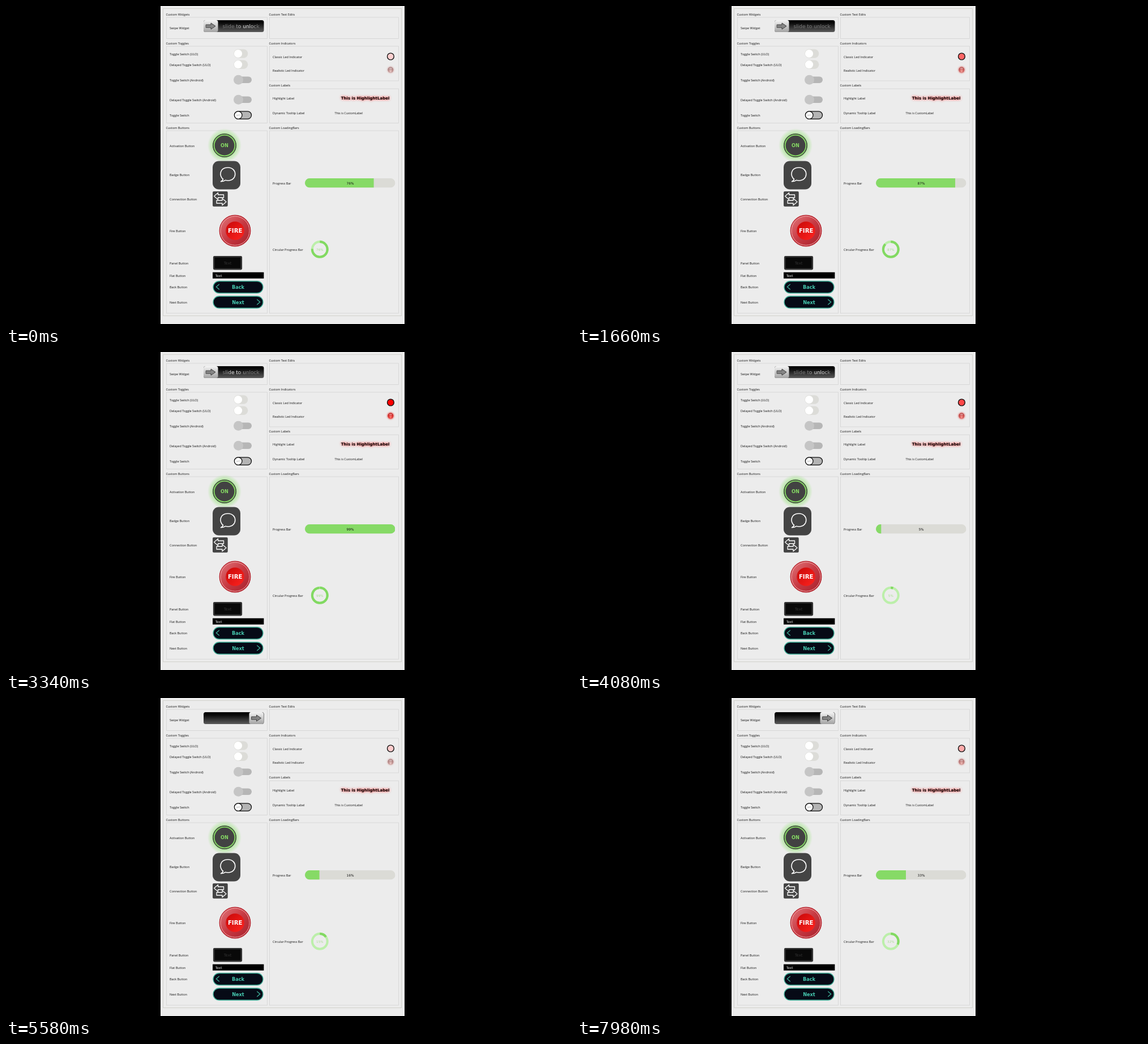
Recreate the animation shown at these times as an HTML page. Size 998 by 561 pixels, loop 8 s.

```html
<!DOCTYPE html>
<html lang="en">
<head>
<meta charset="utf-8">
<title>Custom widgets</title>
<style>
html, body { margin: 0; width: 100%; height: 100%; overflow: hidden; background: #000; }
svg { display: block; width: 100%; height: 100%; }
text { font: 5.5px "Open Sans", sans-serif; fill: #111; }
.wide { font-family: "DejaVu Sans", sans-serif; }
.bold { font-family: "DejaVu Sans", sans-serif; font-weight: bold; }
.mid { text-anchor: middle; }
.line { fill: none; stroke-linejoin: round; stroke-linecap: round; }
</style>
</head>
<body>
<svg viewBox="0 0 998 561">
  <defs>
    <linearGradient id="slot" x2="0" y2="1"><stop offset=".2" stop-color="#060606"/><stop offset="1" stop-color="#5c5c5c"/></linearGradient>
    <linearGradient id="grip" x2="0" y2="1"><stop stop-color="#f4f4f4"/><stop offset="1" stop-color="#a2a2a2"/></linearGradient>
    <linearGradient id="shine" gradientUnits="userSpaceOnUse" x1="-20" x2="20">
      <stop stop-color="#777"/><stop offset=".4" stop-color="#eee"/><stop offset=".6" stop-color="#eee"/><stop offset="1" stop-color="#777"/>
    </linearGradient>
    <radialGradient id="aura"><stop offset=".62" stop-color="#8be36a" stop-opacity=".65"/><stop offset="1" stop-color="#8be36a" stop-opacity="0"/></radialGradient>
    <linearGradient id="rim" x2="1" y2="1"><stop stop-color="#e2777b"/><stop offset=".5" stop-color="#c73a43"/><stop offset="1" stop-color="#a51f2a"/></linearGradient>
    <linearGradient id="core" x2="1" y2="1"><stop stop-color="#c80808"/><stop offset="1" stop-color="#ff2420"/></linearGradient>
    <radialGradient id="bulbOff" cy=".75"><stop stop-color="#eee4e2"/><stop offset=".6" stop-color="#bcaeac"/><stop offset="1" stop-color="#a99b9a"/></radialGradient>
    <radialGradient id="bulbOn" cy=".7"><stop stop-color="#ff8b80"/><stop offset=".6" stop-color="#e33a36"/><stop offset="1" stop-color="#c62a2a"/></radialGradient>
    <filter id="blur" x="-20%" y="-150%" width="140%" height="400%"><feGaussianBlur stdDeviation="2.2"/></filter>
    <filter id="soft" x="-50%" y="-50%" width="200%" height="200%"><feGaussianBlur stdDeviation=".8"/></filter>
    <clipPath id="barClip"><rect x="528" y="304" width="159.5" height="16.5" rx="8.2"/></clipPath>
  </defs>

  <rect x="273" width="431" height="561" fill="#ececec"/>
  <rect x="277.5" y="4.5" width="421" height="542" fill="none" stroke="#d2d2cc"/>
  <g id="groups" fill="none" stroke="#d3d3d3" stroke-width=".8"></g>
  <g id="labels"></g>

  <rect x="349" y="25" width="106.5" height="21" rx="3.5" fill="url(#slot)"/>
  <text id="hint" class="wide" x="382.5" y="39" style="font-size:9px;fill:url(#shine)">slide to unlock</text>
  <g id="handle">
    <rect x="349" y="25" width="25.5" height="21" rx="3.5" fill="url(#grip)"/>
    <path class="line" d="M353.5 33h8.500v-3l8 5.500-8 5.500v-3h-8.500z" style="fill:#858585" stroke="#333" stroke-width=".9"/>
  </g>

  <g id="toggles"></g>
  <rect x="403.500" y="185.800" width="30" height="13.600" rx="6.800" fill="#b4b4b4" stroke="#111" stroke-width="1.300"/>
  <circle cx="410.200" cy="192.600" r="6.800" fill="#fff" stroke="#111" stroke-width="1.300"/>
  <text class="wide mid" x="410.200" y="193.700" style="font-size:3.200px;fill:#888">OFF</text>

  <circle id="led" cx="679.400" cy="89" r="5.900" stroke="#111" stroke-width="1.400"/>
  <circle cx="679.300" cy="112.600" r="6" fill="#d9d2d1" filter="url(#soft)"/>
  <circle cx="679.300" cy="112.600" r="5" fill="url(#bulbOff)"/>
  <g id="bulb">
    <circle cx="679.300" cy="112.600" r="6.300" fill="#f08a86" filter="url(#soft)"/>
    <circle cx="679.300" cy="112.600" r="5" fill="url(#bulbOn)"/>
  </g>
  <ellipse cx="679.300" cy="110.300" rx="2.800" ry="1.500" fill="#fff" opacity=".35"/>

  <text class="bold" x="591.800" y="165" style="font-size:7px;fill:#f00" filter="url(#blur)">This is HighlightLabel</text>
  <text class="bold" x="591.800" y="165" style="font-size:7px;fill:#000">This is HighlightLabel</text>
  <text x="580.500" y="191.400" style="font-size:5.350px">This is CustomLabel</text>

  <circle cx="386" cy="246" r="30" fill="url(#aura)"/>
  <circle cx="386" cy="246" r="20.600" fill="#424242" stroke="#3b5236" stroke-width=".8"/>
  <circle cx="386" cy="246" r="18.400" fill="none" stroke="#86da64" stroke-width="1.900"/>
  <text class="bold mid" x="386" y="249" style="font-size:8.200px;fill:#86da64">ON</text>

  <rect x="365" y="273.500" width="49" height="50" rx="11" fill="#444"/>
  <path class="line" d="M383.500 305.500C376 300 377 285 392 285c17 0 17 23 0 23-2 0-3-.3-4.500-.6-2.500 1.800-5 2.300-8 2.300 2.300-1.200 3.600-2.400 4-4.200z" stroke="#fff" stroke-width="1.600"/>

  <rect x="365" y="327" width="26.700" height="26.700" rx="2" fill="#444"/>
  <path class="line" d="M367.500 335.500l7-6v3.500h10v5h-10v3.500zM389 345.500l-7-6v3.500h-10v5h10v3.500z" stroke="#fff" stroke-width="1.300"/>

  <circle cx="404.500" cy="396.500" r="27.300" fill="url(#rim)" stroke="#b5222c" stroke-width="1.200"/>
  <circle cx="404.500" cy="396.500" r="25.600" fill="none" stroke="#eea5a6" stroke-width="1"/>
  <circle cx="404.500" cy="396.500" r="16.300" fill="url(#core)"/>
  <text class="bold mid" x="404.700" y="400.400" style="font-size:10.200px;fill:#fff">FIRE</text>

  <rect x="367.200" y="442.300" width="48.600" height="21.800" rx="1" fill="#090909" stroke="#333" stroke-width="2.600"/>
  <text class="wide mid" x="391.500" y="455.800" style="font-size:6.800px;fill:#333">Text</text>
  <rect x="365" y="469.700" width="90.400" height="11" fill="#000"/>
  <text class="wide" x="369.700" y="477.500" style="font-size:5.800px;fill:#eee">Text</text>

  <g fill="#060a16" stroke="#3fae98" stroke-width="1.300">
    <rect x="366" y="485.500" width="88" height="21" rx="10.500"/>
    <rect x="366" y="512" width="88" height="21" rx="10.500"/>
    <path class="line" d="M376.300 491.200l-5 4.300 5 4.300M443.700 518l5 4.300-5 4.300"/>
  </g>
  <text class="bold mid" x="410" y="499.200" style="font-size:8.200px;fill:#46c9b0">Back</text>
  <text class="bold mid" x="410" y="525.700" style="font-size:8.200px;fill:#46c9b0">Next</text>

  <g clip-path="url(#barClip)">
    <rect x="528" y="304" width="159.500" height="16.500" fill="#dbdbd6"/>
    <rect id="fill" x="528" y="304" height="16.500" fill="#86da66"/>
  </g>
  <text id="barText" class="wide mid" x="608" y="314.700" style="font-size:5.800px"></text>

  <g fill="none" stroke-width="4.100" transform="rotate(-90 554.300 429.300)">
    <circle cx="554.300" cy="429.300" r="13.400" stroke="#bcefaa"/>
    <circle id="ring" cx="554.300" cy="429.300" r="13.400" stroke="#82d962" pathLength="100"/>
  </g>
  <text id="ringText" class="wide mid" x="554.300" y="431.500" style="font-size:5.600px;fill:#a5df90"></text>
</svg>
<script>
const $ = id => document.getElementById(id);
const clamp = v => Math.max(0, Math.min(1, v));

const column = (x, rows) => rows.map(([text, y]) => `<text x="${x}" y="${y + 2}">${text}</text>`).join('');
$('labels').innerHTML =
  column(282.5, [['Custom Widgets', 14.5], ['Custom Toggles', 65.5], ['Custom Buttons', 214.5]]) +
  column(464.5, [['Custom Text Edits', 14.5], ['Custom Indicators', 65.5], ['Custom Labels', 140], ['Custom LoadingBars', 214.5]]) +
  column(289, [
    ['Swipe Widget', 39], ['Toggle Switch (ULO)', 84.5], ['Delayed Toggle Switch (ULO)', 103.7],
    ['Toggle Switch (Android)', 130.7], ['Delayed Toggle Switch (Android)', 166], ['Toggle Switch', 193],
    ['Activation Button', 246.7], ['Badge Button', 297.8], ['Connection Button', 341], ['Fire Button', 397.3],
    ['Panel Button', 453.7], ['Flat Button', 475.5], ['Back Button', 496], ['Next Button', 522.7]]) +
  column(471, [
    ['Classic Led Indicator', 89.5], ['Realistic Led Indicator', 113.5], ['Highlight Label', 162.7],
    ['Dynamic Tooltip Label', 189.4], ['Progress Bar', 312.7], ['Circular Progress Bar', 429.8]]);

const boxes = (x, width, spans) => spans.map(([top, bottom]) =>
  `<rect x="${x}" y="${top}" width="${width}" height="${bottom - top}"/>`).join('');
$('groups').innerHTML =
  boxes(283.5, 178, [[20, 57.5], [71, 206.5], [220, 542]]) +
  boxes(465.5, 228, [[20, 57.5], [71, 132], [146, 206.5], [220, 542]]);

const pillToggle = y => `<rect x="402.3" y="${y - 7.7}" width="25" height="15.4" rx="7.7" fill="#dcdcd8"/>
  <circle cx="410" cy="${y}" r="7.1" fill="#fff"/>`;
const flatToggle = y => `<rect x="406" y="${y - 5.8}" width="28" height="11.6" rx="5.8" fill="#b6b6b6"/>
  <circle cx="410.5" cy="${y}" r="8.5" fill="#c5c5c5"/>`;
$('toggles').innerHTML = [84, 103.2].map(pillToggle).join('') + [130.2, 165.3].map(flatToggle).join('');

// The picture steps three times per 140 ms: after 20, 20 and 100 ms.
function stepAt(time) {
  const shifted = time + 20;
  return 3 * Math.floor(shifted / 140) + Math.min(2, Math.floor(shifted % 140 / 20));
}

function draw(time) {
  const step = stepAt(time);

  const percent = 0.33 * step + (step < 73 ? 75.92 : -23.55);
  const ringPercent = Math.max(0, percent - 0.23);
  $('fill').setAttribute('width', percent * 1.595);
  $('barText').textContent = Math.floor(percent) + '%';
  $('ring').setAttribute('stroke-dasharray', `${Math.floor(ringPercent)} 100`);
  $('ringText').textContent = Math.floor(ringPercent) + '%';

  const fade = (step + 48) % 60 / 60;
  const pale = Math.round(255 * fade);
  $('led').setAttribute('fill', `rgb(255,${pale},${pale})`);
  $('bulb').setAttribute('opacity', 1 - fade);

  const shineX = 365 + (1.35 * step + 57.5) % 115;
  $('shine').setAttribute('gradientTransform', `translate(${shineX})`);
  const swipe = clamp((step - 98) / 10);
  const eased = swipe * swipe * (3 - 2 * swipe);
  $('handle').setAttribute('transform', `translate(${80.5 * eased})`);
  $('hint').setAttribute('opacity', clamp(1 - 2 * eased));
}

const start = performance.now();
function tick() {
  draw((performance.now() - start) % 8000);
  requestAnimationFrame(tick);
}
tick();
</script>
</body>
</html>
```
